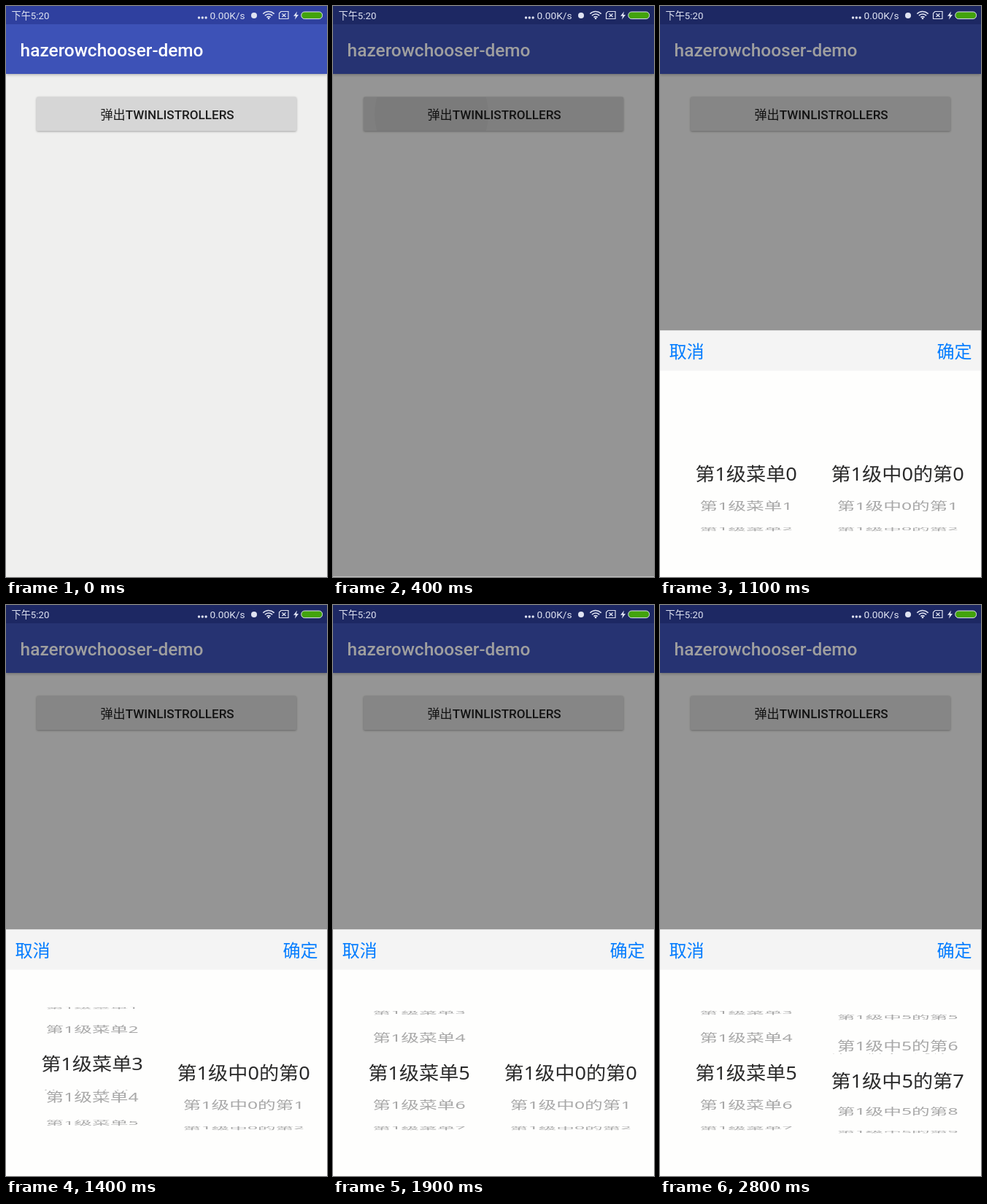
Animation of 440x782 px, one loop 2.9 s. Source, as an HTML page with a canvas:

```html
<!DOCTYPE html>
<html lang="zh">
<head>
<meta charset="utf-8">
<title>Wheel picker</title>
<style>
  html, body { margin: 0; width: 100%; height: 100%; overflow: hidden; background: #efefee; }
  canvas { display: block; }
</style>
</head>
<body>
<canvas id="stage" width="440" height="782"></canvas>
<script>
const ctx = document.getElementById('stage').getContext('2d');
const LOOP = 2900, STEP = 100;
const UI = 'Roboto, "Noto Sans CJK SC", sans-serif';
const HAN = '"Noto Sans", "Noto Sans CJK SC", "Noto Sans CJK", sans-serif';

// Wheel geometry: seven slots spread over half a cylinder
const TEXT_H = 24, ITEM_H = 48, MIN_SQUASH = 0.34;
const SLOT = Math.PI / 6, RADIUS = ITEM_H / SLOT;
const UPPER = RADIUS - ITEM_H / 2, LOWER = RADIUS + ITEM_H / 2;

const progress = (t, start, length) => Math.min(1, Math.max(0, (t - start) / length));
const easeOut = u => 1 - (1 - u) ** 2;
const easeInOut = u => (1 - Math.cos(Math.PI * u)) / 2;

function rect(x, y, w, h, color) {
  ctx.fillStyle = color;
  ctx.fillRect(x, y, w, h);
}

function text(str, x, y, font, color, align = 'left') {
  ctx.font = font;
  ctx.fillStyle = color;
  ctx.textAlign = align;
  ctx.fillText(str, x, y);
}

function dot(x, y, r, color) {
  ctx.fillStyle = color;
  ctx.beginPath();
  ctx.arc(x, y, r, 0, 7);
  ctx.fill();
}

function withShadow(alpha, blur, draw) {
  ctx.save();
  ctx.shadowColor = `rgba(0,0,0,${alpha})`;
  ctx.shadowBlur = blur;
  ctx.shadowOffsetY = 1;
  draw();
  ctx.restore();
}

function drawPage(t) {
  rect(0, 0, 440, 782, '#efefee');
  withShadow(0.3, 4, () => rect(0, 25, 440, 68, '#3d52b7'));
  rect(0, 0, 440, 25, '#2f409f');
  text('hazerowchooser-demo', 19.6, 68.5, `500 24.44px ${UI}`, '#fff');

  ctx.beginPath();
  ctx.roundRect(42, 124.5, 356, 46.5, 1.5);
  ctx.fillStyle = '#d6d6d6';
  withShadow(0.32, 3, () => ctx.fill());

  // Press tint fades after release, the ripple grows until then
  const press = progress(t, 0, 300) * (1 - progress(t, 400, 400));
  ctx.fillStyle = `rgba(0,0,0,${0.05 * press})`;
  ctx.fill();
  if (t < 500) {
    ctx.save();
    ctx.clip();
    dot(135, 148, 78 * progress(t, 100, 300), 'rgba(0,0,0,.03)');
    ctx.restore();
  }
  text('弹出', 129.5, 154.5, `17.1px ${HAN}`, '#1c1c1c');
  text('TWINLISTROLLERS', 163.7, 154.5, `500 17.1px ${UI}`, '#1c1c1c');
}

function drawStatus() {
  const ink = '#dfe3f2';
  text('下午5:20', 7.5, 18, `13.2px ${UI}`, ink);
  text('0.00K/s', 279.5, 18, `13.7px ${UI}`, ink);
  for (const x of [264.5, 269.3, 274.1]) dot(x, 16, 1.7, ink);
  dot(340, 13, 4, ink);

  ctx.strokeStyle = ink;
  ctx.lineWidth = 1.6;
  for (const r of [3.5, 7, 10.5]) {
    ctx.beginPath();
    ctx.arc(360, 18, r, -Math.PI * 0.76, -Math.PI * 0.24);
    ctx.stroke();
  }
  dot(360, 17, 1.3, ink);

  ctx.lineWidth = 1.2;
  ctx.stroke(new Path2D('M377 7.5H387V17.5H374.5V10Z M378.5 10.5L383.5 15M383.5 10.5L378.5 15'));
  ctx.fillStyle = ink;
  ctx.fill(new Path2D('M399 7.5L394 13.8H397L396 18.5L401 12H398Z'));

  ctx.beginPath();
  ctx.roundRect(404.8, 8, 28.8, 9.6, 4.5);
  ctx.fillStyle = '#42a30c';
  ctx.fill();
  ctx.lineWidth = 1;
  ctx.stroke();
}

// One clipped slice of a label, either highlighted or faded
function slice(str, from, to, scale, active) {
  ctx.save();
  ctx.beginPath();
  ctx.rect(-110, from, 220, to - from);
  ctx.clip();
  ctx.scale(active ? 1.1 : 1, active ? scale : scale * 0.8);
  text(str, 0, active ? TEXT_H - 2.4 : TEXT_H, `24.7px ${HAN}`, active ? '#2a2a2a' : '#a8a8a8', 'center');
  ctx.restore();
}

function drawWheel(x, y, position, label) {
  for (let i = 0; i < 10; i++) {
    const angle = Math.PI / 2 + (i - position) * SLOT;
    const squash = Math.sin(angle);
    if (angle <= 0 || angle >= Math.PI || squash < MIN_SQUASH) continue;
    const top = RADIUS - Math.cos(angle) * RADIUS - squash * TEXT_H / 2;
    const bottom = top + TEXT_H;
    const str = label + i;
    ctx.save();
    ctx.translate(x, y + top);
    ctx.scale(1, squash);
    if (top <= UPPER && bottom >= UPPER) {
      slice(str, 0, UPPER - top, squash, false);
      slice(str, UPPER - top, ITEM_H, squash, true);
    } else if (top <= LOWER && bottom >= LOWER) {
      slice(str, 0, LOWER - top, squash, true);
      slice(str, LOWER - top, ITEM_H, squash, false);
    } else if (top >= UPPER && bottom <= LOWER) {
      slice(str, 0, ITEM_H, 1, true);
    } else {
      slice(str, 0, ITEM_H, squash, false);
    }
    ctx.restore();
  }
}

function drawPanel(t) {
  const top = 782 - 337.5 * easeInOut(progress(t, 395, 290));
  if (top >= 782) return;
  rect(0, top, 440, 338, '#fefefd');
  rect(0, top, 440, 55, '#f4f4f4');
  const font = `24.1px ${HAN}`;
  text('取消', 12.5, top + 37.6, font, '#057dff');
  text('确定', 427.6, top + 37.6, font, '#057dff', 'right');

  // The second fling is still under way when the loop restarts
  const left = 5 * easeOut(progress(t, 1130, 658));
  const right = 12.5 * easeOut(progress(t, 2410, 1210));
  const wheelTop = top + 104;
  drawWheel(118, wheelTop, left, '第1级菜单');
  drawWheel(325.6, wheelTop, right, `第1级中${t < 2100 ? 0 : 5}的第`);
}

function frame() {
  const t = Math.floor(performance.now() % LOOP / STEP) * STEP;
  drawPage(t);
  if (t >= 400) rect(0, 0, 440, 782, 'rgba(0,0,0,.376)');
  drawStatus();
  drawPanel(t);
  requestAnimationFrame(frame);
}
frame();
</script>
</body>
</html>
```
